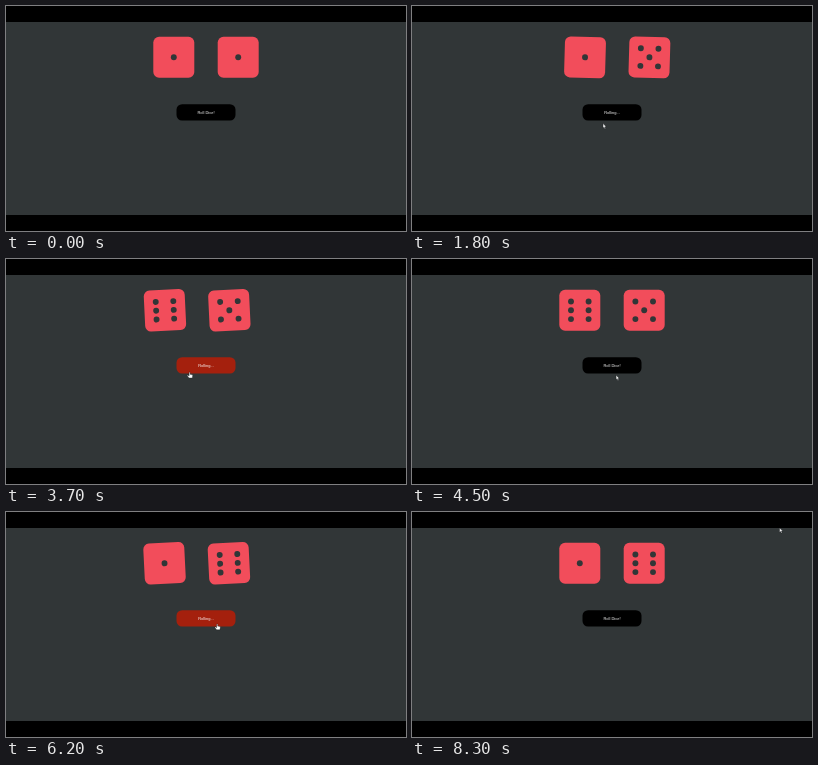
An HTML page that plays this animation: 400 by 225 pixels, repeating every 8.7 s.

```html
<!DOCTYPE html>
<html lang="en">
<head>
<meta charset="utf-8">
<title>Roll Dice</title>
<style>
  html, body { margin: 0; width: 100%; height: 100%; overflow: hidden; background: #000; }
  svg { display: block; width: 100vw; height: 100vh; }
  .die { fill: #f24d5b; }
  .pip { fill: #313637; }
  text { font: 4px "Liberation Sans", Arial, sans-serif; fill: #fff; text-anchor: middle; }
  .pointer { fill: #fff; stroke: #15181a; stroke-width: .35; stroke-linejoin: round; }
</style>
</head>
<body>
<svg viewBox="0 0 400 225">
  <rect width="400" height="225"/>
  <rect y="16" width="400" height="193" fill="#313637"/>
  <g id="dice"></g>
  <rect id="button" x="170.5" y="98.2" width="59" height="16.4" rx="5.6"/>
  <text id="label" x="200" y="107.8"></text>
  <path id="arrow" class="pointer" d="M0 0V4.3L1 3.5L1.8 5.2L2.5 4.9L1.8 3.2H3.1Z"/>
  <path id="hand" class="pointer" d="M-.5 .5Q0 -.2 .5 .5V2.3L2.6 2.8Q3.2 3 3.1 3.7L2.7 6H-.6L-2.3 3.7Q-2.3 2.9 -1.5 3.2L-.5 4Z"/>
</svg>
<script>
const LOOP = 8700, STEP = 100, ROLL = 1000;
const SVG = "http://www.w3.org/2000/svg";
const $ = id => document.getElementById(id);

// start, stop, left value, right value
const rolls = [
  [1250, 2250, 1, 5],
  [3240, 4240, 6, 5],
  [4945, 5945, 1, 3],
  [6150, 6590, 1, 6],
  [6590, 7590, 1, 6],
];

// progress, shift in slot widths, degrees
const wobble = [
  [0, 0, 0], [.15, -.25, -5], [.3, .2, 3], [.45, -.15, -3],
  [.6, .1, 2], [.75, -.05, -1], [1, 0, 0],
];

// time, x, y of the pointer tip
const path = [
  [200, 196, 126], [800, 192.6, 112], [1650, 192.6, 112], [2100, 188, 128.8],
  [2600, 186.2, 123.4], [2900, 183.6, 113], [3700, 183.6, 113], [4100, 190, 125],
  [4700, 211.2, 111.8], [7450, 211.2, 111.8], [7900, 335.2, 27], [8000, 367.6, 15.9],
];

const SLOT = 64.4, GAP = 8.8, CY = 51.3, CX = [167.8, 232.2];
const diag = [[-1, -1], [1, 1]], corners = [...diag, [1, -1], [-1, 1]];
const pips = {
  1: [[0, 0]],
  3: [[0, 0], ...diag],
  5: [[0, 0], ...corners],
  6: [...corners, [-1, 0], [1, 0]],
};

function add(parent, name, attrs) {
  const el = document.createElementNS(SVG, name);
  for (const key in attrs) el.setAttribute(key, attrs[key]);
  return parent.appendChild(el);
}

function makeDie() {
  const die = add($("dice"), "g", {});
  add(die, "rect", { class: "die", x: -20.5, y: -20.5, width: 41, height: 41, rx: 5.8 });
  const faces = {};
  for (const n in pips) {
    faces[n] = add(die, "g", {});
    for (const [x, y] of pips[n])
      add(faces[n], "circle", { class: "pip", cx: x * GAP, cy: y * GAP, r: 2.95 });
  }
  return { die, faces };
}

const dice = CX.map(makeDie);

// CSS "ease": cubic-bezier(.25, .1, .25, 1)
function ease(x) {
  const curve = (a, b, u) => 3 * a * u * (1 - u) ** 2 + 3 * b * u * u * (1 - u) + u ** 3;
  let lo = 0, hi = 1;
  for (let i = 0; i < 24; i++) {
    const mid = (lo + hi) / 2;
    if (curve(.25, .25, mid) < x) lo = mid; else hi = mid;
  }
  return curve(.1, 1, lo);
}

const linear = x => x;

function sample(keys, t, timing) {
  const i = keys.findIndex(k => k[0] > t);
  if (i < 0) return keys[keys.length - 1].slice(1);
  if (i === 0) return keys[0].slice(1);
  const a = keys[i - 1], b = keys[i];
  const p = timing((t - a[0]) / (b[0] - a[0]));
  return a.slice(1).map((v, j) => v + (b[j + 1] - v) * p);
}

const show = (el, on) => el.setAttribute("visibility", on ? "inherit" : "hidden");

function draw(t) {
  const last = rolls.filter(r => r[0] <= t).pop() || [0, 0, 1, 1];
  const rolling = t < last[1];
  const [shift, turn] = rolling ? sample(wobble, (t - last[0]) / ROLL, ease) : [0, 0];
  dice.forEach(({ die, faces }, i) => {
    die.setAttribute("transform", `translate(${CX[i] + shift * SLOT} ${CY}) rotate(${turn})`);
    for (const n in faces) show(faces[n], +n === last[2 + i]);
  });

  const [x, y] = sample(path, t, linear);
  const seen = t >= path[0][0];
  const over = seen && x > 170.5 && x < 229.5 && y > 98.2 && y < 114.6;
  $("button").setAttribute("fill", over ? "#a4200d" : "#000");
  $("label").textContent = rolling ? "Rolling..." : "Roll Dice!";
  for (const id of ["arrow", "hand"]) {
    $(id).setAttribute("transform", `translate(${x} ${y})`);
    show($(id), seen && over === (id === "hand"));
  }
}

const start = performance.now();
function tick() {
  const t = (performance.now() - start) % LOOP;
  draw(Math.floor(t / STEP) * STEP);
  requestAnimationFrame(tick);
}
tick();
</script>
</body>
</html>
```
